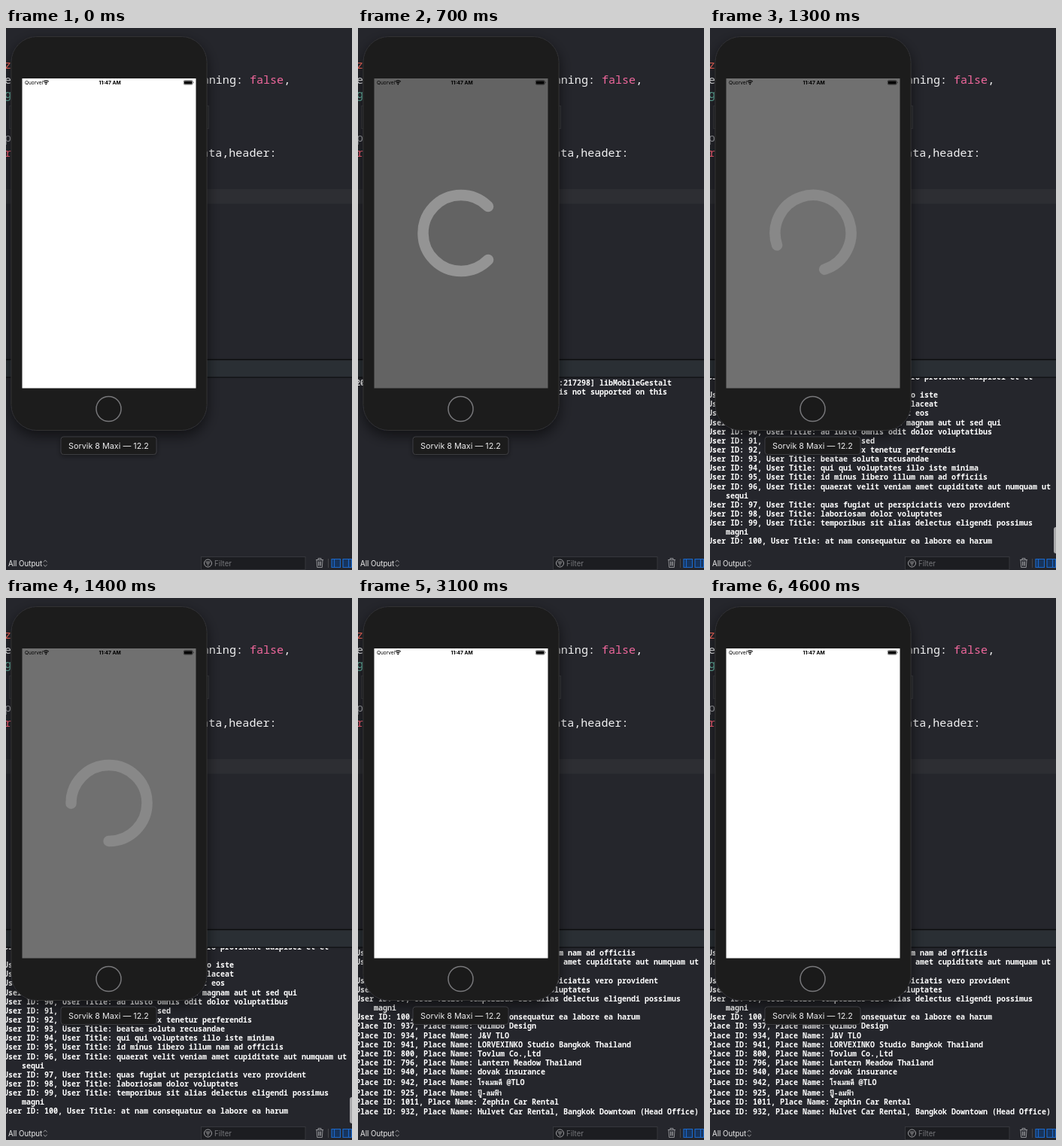
Recreate the animation shown at these times as an HTML page. Size 460 by 720 pixels, loop 4.8 s.

```html
<!DOCTYPE html>
<html lang="en">
<head>
<meta charset="utf-8">
<title>Simulator and console</title>
<style>
  html, body { margin: 0; width: 100%; height: 100%; overflow: hidden; background: #25262c; }
  svg { display: block; width: 460px; height: 720px; }
  text { white-space: pre; }
  .ui { font-family: Inter, Roboto, sans-serif; }
  .code { font: 500 15.05px "Noto Sans Mono", "DejaVu Sans Mono", monospace; fill: #f2f2f3; }
  .log { font: 700 10px "Noto Sans Mono", "DejaVu Sans Mono", monospace; fill: #fff; }
</style>
</head>
<body>
<svg viewBox="0 0 460 720">
  <defs>
    <clipPath id="pane"><rect y="465" width="460" height="235"/></clipPath>
    <filter id="shade" x="-20%" y="-10%" width="140%" height="125%">
      <feDropShadow dx="0" dy="7" stdDeviation="9" flood-color="#000" flood-opacity=".55"/>
    </filter>
    <filter id="soft" x="-20%" y="-50%" width="140%" height="220%">
      <feDropShadow dx="0" dy="2" stdDeviation="3" flood-color="#000" flood-opacity=".4"/>
    </filter>
  </defs>

  <!-- editor -->
  <rect width="460" height="720" fill="#25262c"/>
  <rect y="214" width="460" height="19.5" fill="#2d2e33"/>
  <g class="code">
    <text x="-2" y="53.500" fill="#fc6a5d">z</text>
    <text x="-2" y="73.500">e</text>
    <text x="-2" y="92.500" fill="#67b7a4">g</text>
    <text x="-2" y="151" fill="#a0a1a6">p</text>
    <text x="-2" y="171" fill="#fc5f75">r</text>
    <text x="324" y="73.500" text-anchor="end">Running: </text>
    <text x="324" y="73.500"><tspan fill="#f1689d">false</tspan>,</text>
    <text x="359.500" y="171" text-anchor="end">data,header:</text>
  </g>
  <rect x="4.500" y="103.500" width="265" height="30" fill="#2a2b2f" stroke="#3b3c40"/>

  <!-- console -->
  <rect y="440" width="460" height="25" fill="#2a2f34"/>
  <path d="M0 440.500H460M0 464.200H460" stroke="#0c0d0f" stroke-width="1.300"/>
  <g clip-path="url(#pane)"><g id="log" class="log"></g></g>
  <rect id="bar" x="457" y="663" width="6" height="35" rx="3" fill="#a9a9ab"/>

  <!-- footer -->
  <g class="ui" font-size="9.700">
    <text x="3" y="714.500" fill="#eee">All Output</text>
    <path d="M49.800 709.500l2.400-2.600 2.400 2.600M49.800 712.800l2.400 2.600 2.400-2.600" fill="none" stroke="#9a9a9d"/>
    <rect x="259.500" y="702.500" width="138.500" height="17" fill="#1c1d21" stroke="#36373c"/>
    <g fill="none" stroke="#a0a0a3">
      <circle cx="268.500" cy="711" r="5"/>
      <path d="M265.500 709.300h6M266.500 711.300h4M267.500 713.300h2"/>
      <path d="M412 706.500h10M415 706v-1.500h4v1.500M413 706.500l.7 10h6.600l.7-10M415.500 708.500v6M417 708.500v6M418.500 708.500v6" stroke="#8f9094"/>
      <path d="M428.500 705v12" stroke="#45464a"/>
    </g>
    <text x="277" y="714.500" fill="#76777b">Filter</text>
    <g fill="#17345c" stroke="#1c68c9" stroke-width="1.200">
      <path d="M433 705.500h11.500v11H433zM436.500 705.500v11M448 705.500h11.500v11H448zM455.500 705.500v11"/>
    </g>
  </g>

  <!-- phone -->
  <rect x="7" y="11.500" width="260" height="523" rx="34" fill="#1a1a1a" stroke="#303033" filter="url(#shade)"/>
  <circle cx="136.500" cy="506" r="16.500" fill="#1a1a1a" stroke="#77777a" stroke-width="1.500"/>
  <rect id="screen" x="21.500" y="67" width="231" height="411.500" fill="#fff"/>
  <g class="ui" fill="#000">
    <text x="25" y="75" font-size="6.500">Quorvel</text>
    <text x="138.200" y="75" font-size="6.700" font-weight="700" text-anchor="middle">11:47 AM</text>
    <path d="M49.700 71.300a5 5 0 0 1 7 0M51.200 73a3 3 0 0 1 4 0" fill="none" stroke="#000" stroke-width="1.200"/>
    <circle cx="53.200" cy="74.500" r=".9"/>
    <rect x="236.300" y="69.700" width="11.800" height="5.400" rx="1.300" fill="none" stroke="#000" stroke-width=".5"/>
    <rect x="237" y="70.400" width="10.400" height="4" rx=".7"/>
    <path d="M248.900 71.300q1.200 1.100 0 2.200z"/>
  </g>
  <circle id="ring" r="50.500" fill="none" stroke-width="14.500" stroke-linecap="round" pathLength="360" stroke-dasharray="271 89"/>

  <g class="ui" filter="url(#soft)">
    <rect x="73" y="543" width="127" height="23.500" rx="3.500" fill="#1a1a1b" stroke="#3e3e41"/>
    <text x="136.500" y="558.800" font-size="10.800" fill="#efefef" text-anchor="middle">Sorvik 8 Maxi — 12.2</text>
  </g>
</svg>
<script>
const LOOP = 4800, STEP = 100, COLS = 76, LINE = 12.15, TALL = 14;
const TOP = 474.5, BOTTOM = 685.5;
const $ = id => document.getElementById(id);

const notice = "2019-04-22 11:47:12.264311+0700 DemoApp[21843:217298] libMobileGestalt " +
  "MobileGestalt.c:890: MGIsDeviceOneOfType is not supported on this platform.";

const firstTitles = `sunt aut facere repellat provident occaecati excepturi optio reprehenderit
qui est esse
ea molestias quasi exercitationem repellat qui ipsa sit aut
eum et est occaecati
nesciunt quas odio`.split("\n");

const lastTitles = `dolore veritatis porro provident adipisci et et sunt
placeat quia et porro iste
nostrum quis quasi placeat
sapiente omnis fugit eos
sint soluta et vel magnam aut ut sed qui
ad iusto omnis odit dolor voluptatibus
aut amet sed
ratione ex tenetur perferendis
beatae soluta recusandae
qui qui voluptates illo iste minima
id minus libero illum nam ad officiis
quaerat velit veniam amet cupiditate aut numquam ut sequi
quas fugiat ut perspiciatis vero provident
laboriosam dolor voluptates
temporibus sit alias delectus eligendi possimus magni
at nam consequatur ea labore ea harum`.split("\n");

const places = `937|Quimbo Design
934|J&V TLO
941|LORVEXINKO Studio Bangkok Thailand
800|Tovlum Co.,Ltd
796|Lantern Meadow Thailand
940|dovak insurance
942|โรงเมฆดี @TLO
925|ปู้-ลมฟ้า
1011|Zephin Car Rental
932|Hulvet Car Rental, Bangkok Downtown (Head Office)`.split("\n");

// Seeded titles for the users that only rush past
let seed = 7;
const rand = n => (seed = (seed * 16807) % 2147483647) % n;
const words = "dolorem magnam facilis autem et quia optio molestias odit voluptatem ut rerum eum".split(" ");
const filler = () => Array.from({ length: 3 + rand(5) }, () => words[rand(words.length)]).join(" ");

const titles = [...firstTitles, ...Array.from({ length: 79 }, filler), ...lastTitles];
const entries = [
  notice,
  ...titles.map((t, i) => `User ID: ${i + 1}, User Title: ${t}`),
  ...places.map(p => p.split("|")).map(([id, name]) => `Place ID: ${id}, Place Name: ${name}`)
];

function wrap(entry) {
  const lines = [];
  let line = "";
  for (const word of entry.split(" ")) {
    if (line && line.length + 1 + word.length > COLS) {
      lines.push(line);
      line = "    " + word;
    } else {
      line += (line ? " " : "") + word;
    }
  }
  return [...lines, line];
}

// Each entry becomes a group; ends[i] is the baseline of its last line
const ns = "http://www.w3.org/2000/svg";
const ends = [];
let y = TOP - LINE;
const groups = entries.map(entry => {
  const g = document.createElementNS(ns, "g");
  for (const line of wrap(entry)) {
    y += /[\u0e00-\u0e7f]/.test(line) ? TALL : LINE;
    const text = document.createElementNS(ns, "text");
    text.setAttribute("x", -3);
    text.setAttribute("y", y);
    text.textContent = line;
    g.append(text);
  }
  ends.push(y);
  $("log").append(g);
  return g;
});

// Linear track through [step, value] pairs
function track(keys, n) {
  if (n <= keys[0][0]) return keys[0][1];
  for (let i = 1; i < keys.length; i++) {
    const [a, u] = keys[i - 1], [b, v] = keys[i];
    if (n <= b) return u + (v - u) * (n - a) / (b - a);
  }
  return keys[keys.length - 1][1];
}
const gray = v => `rgb(${v},${v},${v})`.replace(/\d+\.\d+/g, Math.round);

const turn = [[5, -54], [6, -27], [8, 27], [13, 117], [15, 153]];
const dim = [[4, 255], [5, 150], [6, 85], [8, 112], [14, 112], [15, 190], [16, 255]];
const glow = [[5, 200], [6, 160], [8, 136], [14, 136], [15, 205], [16, 255]];
const users = [[8, 5], [12, 100]];

function entryCount(n) {
  if (n < 3) return 0;
  if (n < 8) return 1;
  if (n < 16) return 1 + Math.round(track(users, n));
  return entries.length;
}

let shown = -1;
function draw(n) {
  if (n === shown) return;
  shown = n;
  const count = entryCount(n);
  groups.forEach((g, i) => g.style.display = i < count ? "" : "none");
  const scroll = count ? Math.max(0, ends[count - 1] - BOTTOM) : 0;
  $("log").setAttribute("transform", `translate(0 ${-scroll})`);
  $("bar").style.display = n >= 9 && n < 16 ? "" : "none";

  $("screen").setAttribute("fill", gray(track(dim, n)));
  const ring = $("ring");
  ring.style.display = n >= 5 && n < 16 ? "" : "none";
  ring.setAttribute("stroke", gray(track(glow, n)));
  ring.setAttribute("transform", `translate(137 272.5) rotate(${track(turn, n) + 44.5})`);
}

const start = performance.now();
function tick() {
  draw(Math.floor((performance.now() - start) % LOOP / STEP));
  requestAnimationFrame(tick);
}
tick();
</script>
</body>
</html>
```
